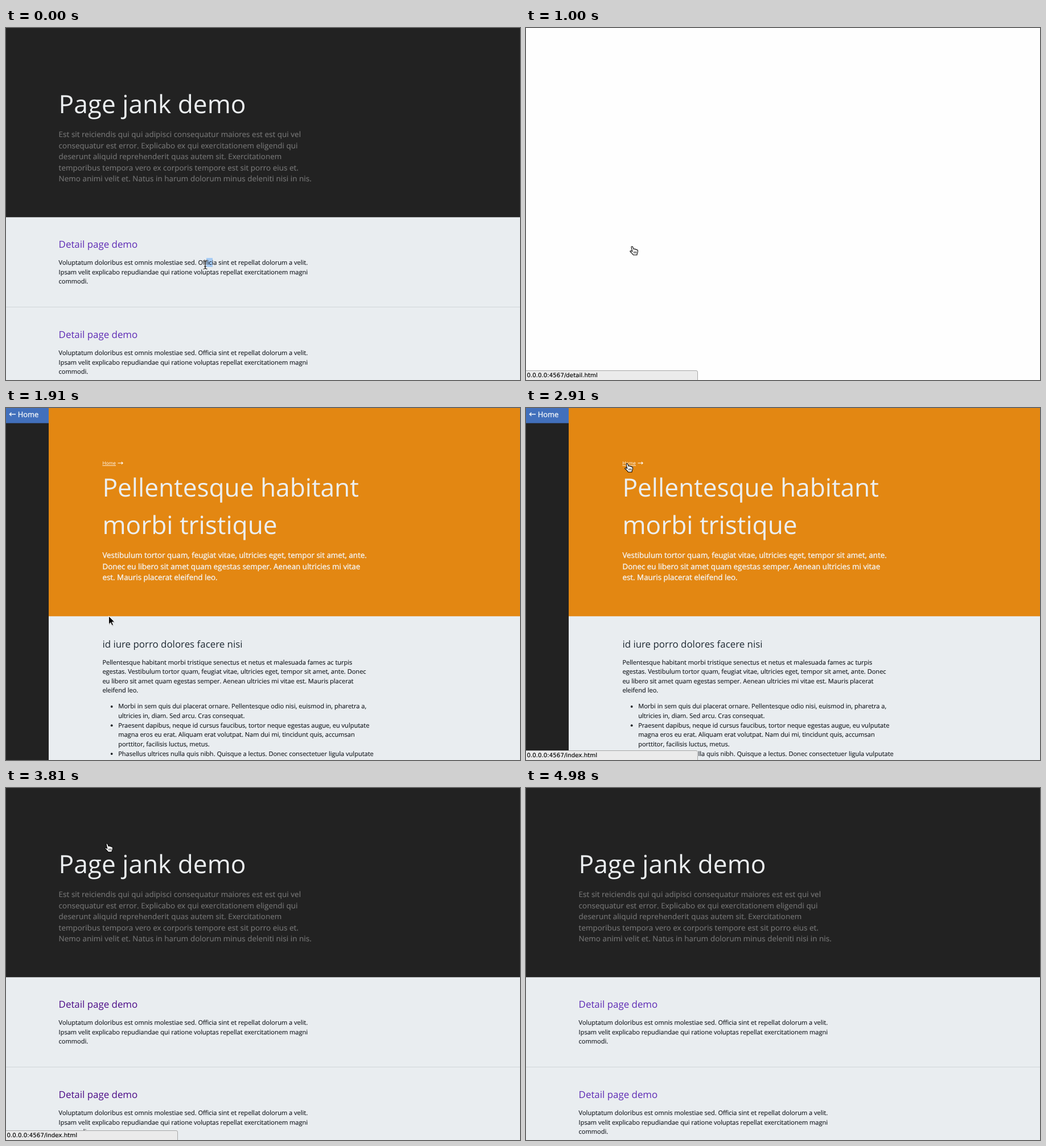
An HTML page that plays this animation: 903x620 px, repeating every 5890 ms.

```html
<!DOCTYPE html>
<html lang="en">
<head>
<meta charset="utf-8">
<title>Page jank demo</title>
<style>
html, body { margin: 0; width: 100%; height: 100%; overflow: hidden; background: #fefefe; }
svg { display: block; width: 903px; height: 620px; }
text { font-family: "Open Sans", "Noto Sans", sans-serif; text-rendering: geometricPrecision; white-space: pre; }
.title { font-size: 44.2px; fill: #eceff1; }
.intro { font-size: 13.35px; letter-spacing: .08px; fill: #777; stroke: #777; stroke-width: .15px; }
.lead { font-size: 13.35px; letter-spacing: .02px; fill: #f4f2ee; stroke: #f4f2ee; stroke-width: .4px; }
.head { font-size: 16.9px; fill: #1f2a33; }
.body { font-size: 11.04px; fill: #15191f; stroke: #15191f; stroke-width: .15px; }
.nav { font-size: 12.95px; fill: #f2f5f8; stroke: #f2f5f8; stroke-width: .35px; }
.crumb { font-size: 8.3px; }
.status { font-family: "DejaVu Sans", "Open Sans", sans-serif; font-size: 10.25px; fill: #000; stroke: #000; stroke-width: .15px; }
</style>
</head>
<body>
<svg viewBox="0 0 903 620">
  <rect width="903" height="620" fill="#fefefe"/>
  <g id="home"></g>
  <g id="detail"></g>
  <g id="status">
    <path d="M-1 621V603.5H299Q301.5 603.5 301.5 606V621Z" fill="#ebebeb" stroke="#a6a6a6"/>
    <text id="url" class="status" x="1.5" y="615"></text>
  </g>
  <g id="arrow">
    <path d="M0 0V14.5L3.3 11.4L5.6 16.6L8 15.6L5.7 10.5H10.3Z" transform="translate(.6 1.2)" opacity=".25"/>
    <path d="M0 0V14.5L3.3 11.4L5.6 16.6L8 15.6L5.7 10.5H10.3Z" stroke="#fff" stroke-width=".9"/>
  </g>
  <g id="beam" fill="none">
    <path id="stem" d="M-3.5 -7.5Q0 -7.5 0 -5Q0 -7.5 3.5 -7.5M0 -5V5M-3.5 7.5Q0 7.5 0 5Q0 7.5 3.5 7.5M-2 3H2"/>
  </g>
  <g id="hand">
    <g transform="translate(-5 -1)" stroke="#000" stroke-linejoin="round">
      <path d="M3 2C3 .3 5 .3 5.6 1.8L7.2 5.6C8.2 4.6 9.6 5 9.8 6C10.8 5.2 12 5.8 12.2 6.8C13.4 6.2 14.4 7 14.4 8.4C14.6 11 14 12.5 13 14.5V15.8H6.5C5.5 13.8 3.8 12.6 1.2 10C.3 9 1.6 7.7 3 8.6L4.8 9.8Z" fill="#fff" stroke-width="1.1"/>
      <path d="M7.7 9.5V13M9.7 9.5V13M11.7 9.5V13" fill="none" stroke-width=".8"/>
    </g>
  </g>
</svg>
<script>
const LOOP = 5890;
const $ = id => document.getElementById(id);
const rect = (x, y, w, h, fill) => `<rect x="${x}" y="${y}" width="${w}" height="${h}" fill="${fill}"/>`;
const lines = (cls, x, y, step, rows) =>
  rows.map((row, i) => `<text class="${cls}" x="${x}" y="${y + i * step}">${row}</text>`).join("");

function entry(y) {
  return lines("head link", 92.6, y, 0, ["Detail page demo"]) +
    lines("body", 92.6, y + 29.7, 16.63, [
      "Voluptatum doloribus est omnis molestiae sed. Officia sint et repellat dolorum a velit.",
      "Ipsam velit explicabo repudiandae qui ratione voluptas repellat exercitationem magni",
      "commodi."]);
}

$("home").innerHTML =
  rect(0, 0, 903, 620, "#e9edf0") + rect(0, 0, 903, 333.3, "#222") +
  rect(0, 491, 903, 1, "#d0d5d9") +
  `<rect id="mark" x="352" y="405" width="11" height="16" fill="#a8cdf6"/>` +
  lines("title", 92.6, 150, 0, ["Page jank demo"]) +
  lines("intro", 92.6, 192.3, 19.44, [
    "Est sit reiciendis qui qui adipisci consequatur maiores est est qui vel",
    "consequatur est error. Explicabo ex qui exercitationem eligendi qui",
    "deserunt aliquid reprehenderit quas autem sit. Exercitationem",
    "temporibus tempora vero ex corporis tempore est sit porro eius et.",
    "Nemo animi velit et. Natus in harum dolorum minus deleniti nisi in nis."]) +
  entry(387.4) + entry(546.4);

$("detail").innerHTML =
  rect(0, 0, 903, 620, "#e9edf0") + rect(75, 0, 828, 366.8, "#e38712") +
  rect(0, 0, 75, 620, "#222") + rect(0, 0, 75, 26.7, "#4270bc") +
  `<path d="M17 11H6.5M9.5 8L6.3 11L9.5 14" fill="none" stroke="#f2f5f8" stroke-width="1.4"/>` +
  lines("nav", 20.7, 15.5, 0, ["Home"]) +
  `<g id="crumb">${lines("crumb", 169.4, 100, 0, ["Home"])}${rect(169.4, 101, 23.6, 0.8, "currentColor")}</g>` +
  `<path d="M196.5 97H205M202.8 94.8L205.2 97L202.8 99.2" fill="none" stroke="#fff" stroke-width="1.1"/>` +
  lines("title", 169.4, 155.5, 66.6, ["Pellentesque habitant", "morbi tristique"]) +
  lines("lead", 169.4, 264.4, 19.44, [
    "Vestibulum tortor quam, feugiat vitae, ultricies eget, tempor sit amet, ante.",
    "Donec eu libero sit amet quam egestas semper. Aenean ultricies mi vitae",
    "est. Mauris placerat eleifend leo."]) +
  lines("head", 169.4, 421.8, 0, ["id iure porro dolores facere nisi"]) +
  lines("body", 169.4, 451.6, 16.63, [
    "Pellentesque habitant morbi tristique senectus et netus et malesuada fames ac turpis",
    "egestas. Vestibulum tortor quam, feugiat vitae, ultricies eget, tempor sit amet, ante. Donec",
    "eu libero sit amet quam egestas semper. Aenean ultricies mi vitae est. Mauris placerat",
    "eleifend leo."]) +
  lines("body", 197.2, 529.4, 16.63, [
    "Morbi in sem quis dui placerat ornare. Pellentesque odio nisi, euismod in, pharetra a,",
    "ultricies in, diam. Sed arcu. Cras consequat.",
    "Praesent dapibus, neque id cursus faucibus, tortor neque egestas augue, eu vulputate",
    "magna eros eu erat. Aliquam erat volutpat. Nam dui mi, tincidunt quis, accumsan",
    "porttitor, facilisis luctus, metus.",
    "Phasellus ultrices nulla quis nibh. Quisque a lectus. Donec consectetuer ligula vulputate"]) +
  [0, 2, 5].map(i => `<circle cx="185.7" cy="${525.9 + i * 16.63}" r="1.9" fill="#15191f"/>`).join("");

// Light halo under the dark text cursor.
$("beam").innerHTML =
  ["#fff", "#000"].map((color, i) =>
    `<path d="${$("stem").getAttribute("d")}" stroke="${color}" stroke-width="${2.2 - i * 1.1}"/>`).join("");

const links = document.querySelectorAll(".link");
const show = (id, on) => $(id).style.display = on ? "" : "none";
const smooth = p => p * p * (3 - 2 * p);
const easeOut = p => 1 - (1 - p) ** 2;

// Position after hard steps spread evenly from t0 to t1; lead counts the first step as movement.
function glide(t, t0, t1, steps, from, to, ease, lead) {
  const k = Math.min(steps - 1, Math.floor((t - t0) / (t1 - t0) * (steps - 1) + 1e-6));
  const p = ease(lead ? (k + 1) / steps : k / (steps - 1));
  return from.map((v, i) => v + (to[i] - v) * p);
}

const TITLE_LINK = [187, 385], CRUMB_LINK = [178, 98], REST = [168, 113];
const homeText = ([x, y]) => x > 92 && x < 540 &&
  (y > 106 && y < 166 || y > 178 && y < 275 || y > 405 && y < 455);
const detailText = ([, y]) => y > 105 && y < 310;

function cursor(t) {
  if (t < 180) return ["beam", [350, 417]];
  if (t < 320) return ["beam", [348, 417]];
  if (t < 1910) {
    const p = glide(t, 320, 610, 4, [348, 417], TITLE_LINK, easeOut, true);
    return [homeText(p) ? "beam" : p[0] < 230 ? "hand" : "arrow", p];
  }
  if (t < 2520) {
    const p = glide(t, 1910, 2440, 7, [180.5, 366.5], REST, smooth, false);
    return [detailText(p) ? "beam" : "arrow", p];
  }
  if (t < 4340) {
    const p = glide(t, 2520, 2910, 5, REST, CRUMB_LINK, easeOut, true);
    return [p[1] < 106 ? "hand" : "beam", p];
  }
  if (t < 4980) {
    const p = glide(t, 4340, 4890, 8, CRUMB_LINK, [760, 594.5], smooth, true);
    return [homeText(p) ? "beam" : "arrow", p];
  }
  return ["none", [0, 0]];
}

function draw(t) {
  show("home", t < 1000 || t >= 3810);
  show("detail", t >= 1080 && t < 3720);
  show("mark", t < 1000);
  const fresh = t >= 3810 && t < 3980;
  links.forEach(a => a.style.fill = fresh ? "#4b0a87" : "#5e2bb5");
  const tint = t < 1230 ? "#551a8b" : "#fff";
  $("crumb").style.color = $("crumb").style.fill = tint;

  const toDetail = t >= 610 && t < 1230;
  show("status", toDetail || t >= 2715 && t < 4160);
  $("url").textContent = `0.0.0.0:4567/${toDetail ? "detail" : "index"}.html`;

  const [kind, [x, y]] = cursor(t);
  for (const id of ["arrow", "beam", "hand"]) {
    show(id, id === kind);
    $(id).setAttribute("transform", `translate(${x.toFixed(1)} ${y.toFixed(1)})`);
  }
}

const start = performance.now();
function tick(now) {
  draw(Math.max(0, now - start) % LOOP);
  requestAnimationFrame(tick);
}
draw(0);
requestAnimationFrame(tick);
</script>
</body>
</html>
```
